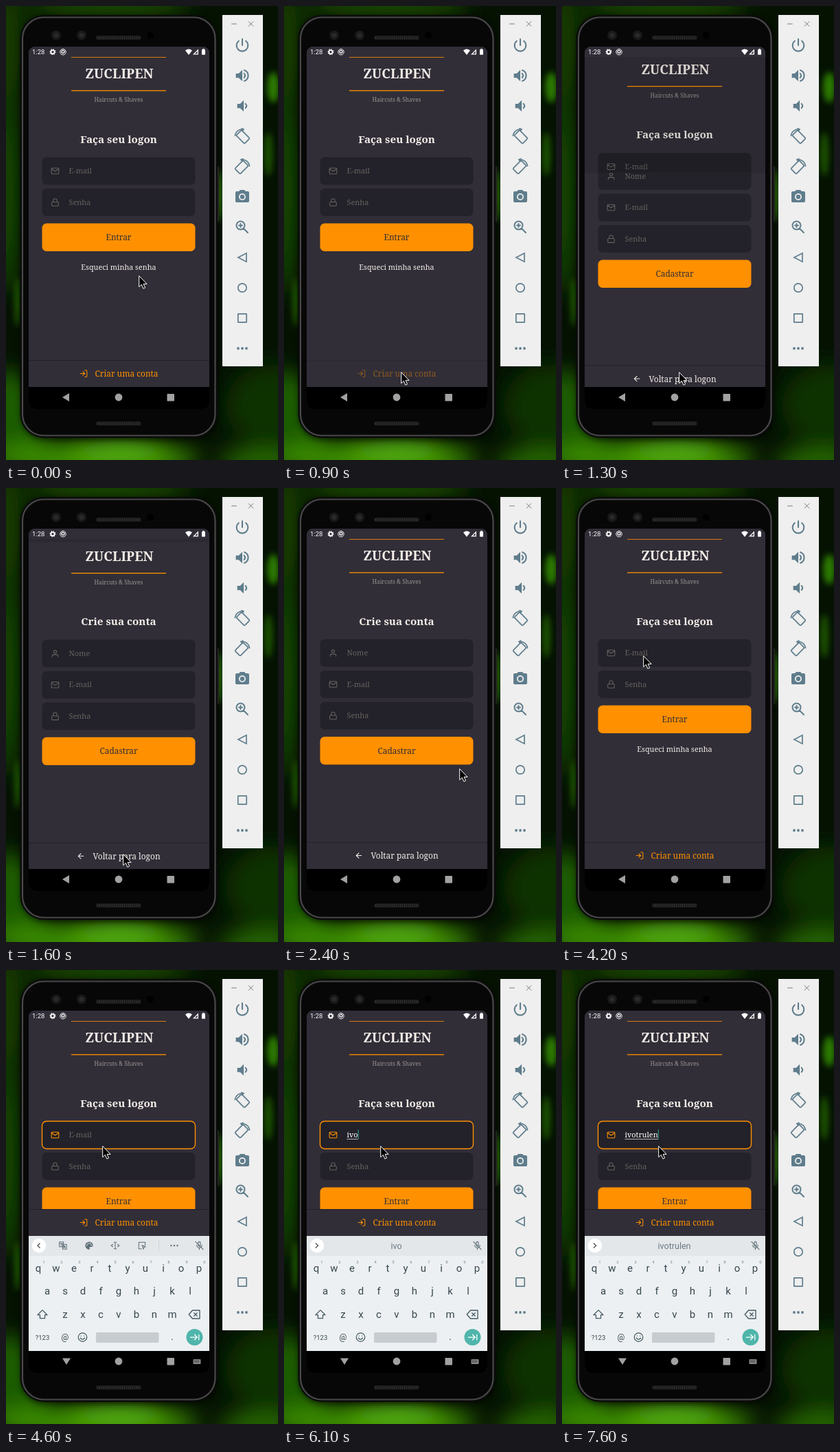
An HTML page for the animation above (8000 ms loop, 396x659 px).

```html
<!DOCTYPE html>
<html lang="pt">
<head>
<meta charset="utf-8">
<title>Logon</title>
<style>
html, body { margin: 0; width: 100%; height: 100%; overflow: hidden; background: #051202 }
svg { display: block; width: 396px; height: 659px }
text { font-family: "Noto Serif", serif; font-size: 11.9px; font-weight: 500; fill: #f4ede8 }
.mid, .key, .hint { text-anchor: middle }
.title { font-size: 15.2px; font-weight: 700 }
.input { font-size: 10.9px; font-weight: 400; fill: #666360 }
.dark { fill: #312e38 }
.key, .sans, .hint { font-family: Roboto, sans-serif; font-size: 15px; font-weight: 400; fill: #37474f }
.hint { font-size: 6px; fill: #78868d }
</style>
</head>
<body>
<svg viewBox="0 0 396 659" id="stage"></svg>
<script>
const ORANGE = '#ff9000', BG = '#312e38', SLATE = '#5f7d8c', CREAM = '#f4ede8', GREY = '#666360', KEY = '#455a64';
const NAME = 'ivotrulen';
const TOP = 59, HEIGHT = 494;

const rect = (x, y, w, h, fill, rx = 0, more = '') =>
  `<rect x="${x}" y="${y}" width="${w}" height="${h}" rx="${rx}" fill="${fill}" ${more}/>`;
const dot = (x, y, r, fill, more = '') => `<circle cx="${x}" cy="${y}" r="${r}" fill="${fill}" ${more}/>`;
const path = (d, fill, more = '') => `<path d="${d}" fill="${fill}" ${more}/>`;
const text = (x, y, s, cls = '', more = '') => `<text x="${x}" y="${y}" class="${cls}" ${more}>${s}</text>`;
// 24-unit icons centred on x, y
const place = (x, y, size) => `transform="translate(${x} ${y}) scale(${size / 24}) translate(-12 -12)"`;
const icon = (x, y, size, d, color, width = 2, more = '') => path(d, 'none', place(x, y, size) +
  ` stroke="${color}" stroke-width="${width}" stroke-linecap="round" stroke-linejoin="round" ${more}`);
const solid = (x, y, size, d, color) => path(d, color, place(x, y, size) + ' fill-rule="evenodd"');

const ring = (x, y, r) => `M${x - r} ${y}a${r} ${r} 0 1 0 ${2 * r} 0a${r} ${r} 0 1 0 ${-2 * r} 0z`;
const MAIL = 'M4 4h16a2 2 0 0 1 2 2v12a2 2 0 0 1-2 2H4a2 2 0 0 1-2-2V6a2 2 0 0 1 2-2zM22 6l-10 7L2 6';
const LOCK = 'M5 11h14a2 2 0 0 1 2 2v7a2 2 0 0 1-2 2H5a2 2 0 0 1-2-2v-7a2 2 0 0 1 2-2zM7 11V7a5 5 0 0 1 10 0v4';
const USER = 'M20 21v-2a4 4 0 0 0-4-4H8a4 4 0 0 0-4 4v2' + ring(12, 7, 4);
const LOGIN = 'M15 3h4a2 2 0 0 1 2 2v14a2 2 0 0 1-2 2h-4M10 17l5-5-5-5M15 12H3';
const BACK = 'M19 12H5M12 19l-7-7 7-7';
const MIC = 'M12 3a2.5 2.5 0 0 1 2.5 3v5a2.5 2.5 0 0 1-5 0V6a2.5 2.5 0 0 1 2.5-3M6 11a6 6 0 0 0 12 0M12 17v4M3 3l18 18';

function field(y, d, label, id = '') {
  return rect(52.5, y, 223, 40, '#232129', 6.5, id && `id="${id}Box"`) +
    icon(71.5, y + 20, 12.8, d, GREY, 2, id && `id="${id}Icon"`) +
    text(91.5, y + 23.7, label, 'input', id && `id="${id}Label"`);
}

const button = (y, label) => rect(52.5, y, 223, 40.5, ORANGE, 6.5) + text(164, y + 24.5, label, 'mid dark');

const header = title => rect(33, TOP, 263, HEIGHT + 30, BG) +
  rect(95, 74, 138, 1, ORANGE, 0, 'opacity=".8"') + rect(95, 122.2, 138, 1.3, ORANGE) +
  text(165, 105, 'ZUCLIPEN', 'mid', 'style="font-size:19px;font-weight:700"') +
  text(164, 139, 'Haircuts &amp; Shaves', 'mid', 'style="font-size:8.2px;fill:#999591"') +
  text(164, 198.7, title, 'mid title');

const footer = (id, d, iconX, textX, label, color) => `<g id="${id}">` +
  rect(33, 514, 263, 39, BG) + rect(33, 514, 263, 1, '#232129') +
  icon(iconX, 533.5, 12.8, d, color) + text(textX, 538, label, '', `style="fill:${color}"`) + '</g>';

function backdrop() {
  const glow = ([x, y, rx, ry, c]) => `<ellipse cx="${x}" cy="${y}" rx="${rx}" ry="${ry}" fill="${c}"/>`;
  const soft = [
    [0, 60, 30, 90, '#123a00'], [0, 270, 22, 150, '#184a00'], [0, 600, 60, 70, '#1f5c00'],
    [150, 0, 120, 18, '#1d5000'], [390, 580, 70, 60, '#0e3300'], [130, 658, 150, 26, '#3c9200'],
    [165, 645, 70, 16, '#58b808'], [370, 662, 60, 18, '#2a7200']
  ];
  const crisp = [
    [389, 118, 9, 22, '#2c7800'], [382, 215, 6, 32, '#1b5200'], [311, 275, 3, 38, '#3c9a00'], [17, 430, 3, 36, '#2c7a00']
  ];
  return `<g filter="url(#haze)">${soft.map(glow).join('')}</g><g filter="url(#blur)">${crisp.map(glow).join('')}</g>`;
}

const grille = y => rect(131, y, 66, 6, '#1c1c1c', 3) +
  path(`M133 ${y + 3}h62`, 'none', 'stroke="#303030" stroke-width="4" stroke-dasharray="1 2"');

function phone() {
  return rect(21, 15, 287, 614, '#000', 34, 'filter="url(#blur)" opacity=".6"') +
    rect(307, 233, 3, 80, '#242424', 1) +
    rect(20.5, 13, 287.5, 614, '#0b0b0b', 35) +
    rect(24, 16.5, 280.5, 607, '#080808', 31, 'stroke="#484848" stroke-width="2.2"') +
    rect(28, 20, 272.5, 600, '#070707', 27) +
    [73, 110].map(x => dot(x, 42.5, 7, '#191919') + dot(x, 42.5, 3.5, '#292929')).join('') +
    dot(210, 42.5, 5, '#000') + grille(43) + grille(603);
}

function statusBar() {
  return rect(33, TOP, 263, 15, BG) +
    text(38, 70.3, '1:28', 'sans', 'style="font-size:9.5px;fill:#fff"') +
    dot(68, 66.7, 2.6, 'none', 'stroke="#fff" stroke-width="1.8"') +
    dot(68, 66.7, 3.9, 'none', 'stroke="#fff" stroke-width="1.2" stroke-dasharray="1.5 1.56"') +
    dot(83, 66.7, 4.2, 'none', 'stroke="#fff"') + dot(83, 66.3, 2, 'none', 'stroke="#fff" stroke-width="1.3"') +
    path('M261 64.5q5-4 10 0l-5 6.5zM280 62.5v8h-8z', '#fff') +
    path('M278.7 65.5v3.7h-3.7z', BG) +
    rect(285, 63.2, 5, 7.5, '#fff', .7) + rect(286.3, 62, 2.4, 2, '#fff');
}

function navBar() {
  const light = '#a2a2a2';
  return rect(33, 553, 263, 33, '#000') +
    path('M82 568l10-6v12z', light, 'id="navBack"') + path('M82 563.5h12l-6 9.5z', light, 'id="navDown"') +
    dot(164, 568, 5.4, light) + rect(234.5, 563, 10.5, 10.5, light, .7) +
    '<g id="navKeys">' + rect(272.5, 565, 11, 7, '#888', 1) +
    path('M274 567h8M274 569h8', 'none', 'stroke="#000" stroke-dasharray="1 1"') + '</g>';
}

function keyboard() {
  const row = (keys, x, y, cls = 'key') => [...keys].map((k, i) => text(x + 26 * i, y, k, cls)).join('');
  const tool = (x, d) => icon(x, 400, 14, d, '#607078', 1.8);
  return rect(33, 386, 263, 190, '#edf0f2') + rect(33, 386, 263, 29, '#e3e7ea') +
    dot(48, 400, 10.3, '#fff') + path('', 'none', 'id="chevron" stroke="#555" stroke-width="1.4"') +
    icon(281.5, 400, 15, MIC, '#607078', 1.8) +
    '<g id="tools">' +
    tool(83, 'M3 3h10v12H3zM11 9h10v12H11zM5 7h6M8 7v5M14 18l2-6 2 6') +
    solid(121, 400, 15, 'M12 3a9 9 0 0 0 0 18c2 0 2-2 1-3s0-3 2-3h2c3 0 4-2 4-4c0-4-4-8-9-8' +
      ring(6.5, 11, 1.5) + ring(9.5, 7, 1.5) + ring(14.5, 7, 1.5) + ring(17.5, 11, 1.5), '#607078') +
    tool(159, 'M9 4h6M12 4v16M9 20h6M6 9l-4 3 4 3M18 9l4 3-4 3') +
    tool(198, 'M20 11V4H4v16h7M12 11l9 4-4 1-1 5z') +
    rect(222, 392, 1, 16, '#cfd5d8') + [240.5, 245, 249.5].map(x => dot(x, 400, 1.2, '#607078')).join('') + '</g>' +
    text(163.5, 404.7, '', 'key', 'id="suggestion" style="font-size:12.5px;fill:#6c7a82"') +
    row('qwertyuiop', 47, 437.5) + row('1234567890', 55, 426, 'hint') +
    row('asdfghjkl', 60, 471) + row('zxcvbnm', 86, 504.5) +
    icon(53, 500, 17, 'M12 3L2 13h5v7h10v-7h5z', KEY, 1.8) +
    icon(274.5, 500, 18, 'M8 4h14v16H8l-7-8zM11 9l6 6M17 9l-6 6', KEY, 1.8) +
    text(53, 536.5, '?123', 'key', 'style="font-size:9.5px"') + text(86, 537, '@', 'key', 'style="font-size:12px"') +
    icon(111.5, 533, 15, ring(12, 12, 10) + 'M7 14q5 6 10 0M8.5 9v.1M15.5 9v.1', KEY) +
    rect(131, 526, 91.5, 15, '#c7ccd0', 2) + text(242, 537, '.', 'key') +
    dot(274.5, 533, 12, '#4fb5ab') + icon(274.5, 533, 15, 'M2 12h16M12 6l6 6-6 6M22 6v12', '#fff');
}

function toolbar() {
  const small = (x, d) => icon(x, 26, 9, d, '#777', 2.6);
  const line = `stroke="${SLATE}" stroke-width="1.7"`;
  const tilt = (y, flip) => `<g transform="translate(344 ${y}) scale(${flip} 1)" fill="none" ${line}>` +
    '<rect x="-5.5" y="-8.5" width="11" height="17" rx="1.5" transform="translate(1 1) rotate(-45)"/>' +
    '<path d="M-10.5 0A10.500 10.500 0 0 1 2-10M-1.500-11.500l3.500 1.500-2.500 3"/></g>';
  return rect(315, 13, 59, 510, '#efefef') +
    small(332, 'M3 12h18') + small(356.5, 'M3 3l18 18M21 3L3 21') +
    icon(344, 57, 25, 'M12 3.500v8.500M7 6a8 8 0 1 0 10 0', SLATE, 2) +
    solid(344, 101, 25, 'M3 9v6h4l5 5V4L7 9z', SLATE) +
    icon(344, 101, 25, 'M14.5 9q3 3 0 6M15 4.500a8 8 0 0 1 0 15', SLATE) +
    solid(344, 145, 25, 'M5 9v6h4l5 5V4L9 9z', SLATE) + icon(344, 145, 25, 'M16.5 9q3 3 0 6', SLATE) +
    tilt(189, 1) + tilt(233, -1) +
    solid(344, 277, 24, 'M9 2L7 4H4a2 2 0 0 0-2 2v12a2 2 0 0 0 2 2h16a2 2 0 0 0 2-2V6a2 2 0 0 0-2-2h-3l-2-2z' +
      ring(12, 12, 5) + ring(12, 12, 3.2), SLATE) +
    icon(344, 321, 24, ring(9.5, 9.5, 6) + 'M14 14l6 6M7 9.5h5M9.5 7v5', SLATE) +
    path('M338 365l12-6.2v12.4z', 'none', line) +
    dot(344, 409, 6.2, 'none', line) + rect(337.8, 446.8, 12.4, 12.4, 'none', .5, line) +
    [338, 344, 350].map(x => dot(x, 497, 1.9, SLATE)).join('');
}

document.getElementById('stage').innerHTML = `<defs>
  <filter id="haze" x="-100%" y="-100%" width="300%" height="300%"><feGaussianBlur stdDeviation="16"/></filter>
  <filter id="blur" x="-100%" y="-100%" width="300%" height="300%"><feGaussianBlur stdDeviation="4"/></filter>
  <clipPath id="screen"><rect x="33" y="59" width="263" height="526" rx="9"/></clipPath>
  <clipPath id="app"><rect x="33" y="74" width="263" height="479"/></clipPath>
  <clipPath id="reveal"><rect id="revealBox" x="33" width="263" height="${HEIGHT}"/></clipPath></defs>` +
  rect(0, 0, 396, 659, '#051202') + backdrop() + phone() +
  '<g clip-path="url(#screen)">' + rect(33, TOP, 263, 526, BG) + statusBar() +
  '<g clip-path="url(#app)"><g id="login">' + header('Faça seu logon') +
  field(219.5, MAIL, 'E-mail', 'mail') + rect(91.5, 245, 0, .8, '#ddd', 0, 'id="underline"') +
  rect(91.5, 231.5, 1.2, 14, '#2f9488', 0, 'id="caret"') +
  field(265, LOCK, 'Senha') + button(315.5, 'Entrar') +
  text(164, 383, 'Esqueci minha senha', 'mid', 'style="font-size:10.8px"') +
  footer('create', LOGIN, 113, 129.5, 'Criar uma conta', ORANGE) + '</g>' +
  rect(33, TOP, 263, HEIGHT, '#000', 0, 'id="shade"') +
  '<g clip-path="url(#reveal)"><g id="signup">' + header('Crie sua conta') +
  field(219.5, USER, 'Nome') + field(265, MAIL, 'E-mail') + field(310.5, LOCK, 'Senha') + button(361, 'Cadastrar') +
  footer('return', BACK, 109, 126.5, 'Voltar para logon', CREAM) + '</g></g>' +
  `<g id="keyboard">${keyboard()}</g></g>` + navBar() + '</g>' + toolbar() +
  path('M.7.7v16l3.700-3.400 2.500 5.800 2.700-1.200-2.500-5.500h5z', '#000', 'id="cursor" stroke="#fff"');

const el = Object.fromEntries([...document.querySelectorAll('#stage [id]')].map(e => [e.id, e]));
const set = (id, name, value) => el[id].setAttribute(name, value);
const show = (id, on) => set(id, 'visibility', on ? 'visible' : 'hidden');
const shift = (id, y) => set(id, 'transform', `translate(0 ${y})`);

// cubic-bezier(.208, .82, .25, 1)
function ease(u) {
  if (u <= 0) return 0;
  if (u >= 1) return 1;
  const curve = (s, a, b) => 3 * (1 - s) ** 2 * s * a + 3 * (1 - s) * s * s * b + s ** 3;
  let lo = 0, hi = 1;
  for (let i = 0; i < 24; i++) {
    const s = (lo + hi) / 2;
    if (curve(s, .208, .25) < u) lo = s; else hi = s;
  }
  return curve(lo, .82, 1);
}

const pointer = [[0, 193, 391], [400, 174, 470], [600, 161, 524], [700, 170, 531], [2000, 170, 531],
  [2100, 175, 527], [2400, 255, 407], [2900, 255, 407], [3000, 176, 524], [3200, 176, 524],
  [3400, 141, 504], [4200, 118, 243], [4400, 118, 243], [4600, 140, 255], [8000, 140, 255]];
const strokes = [5700, 6000, 6100, 6300, 6700, 7000, 7100, 7500, 7600];

function pointerAt(t) {
  const i = pointer.findIndex(k => k[0] > t), [t0, x0, y0] = pointer[i - 1], [t1, x1, y1] = pointer[i];
  const u = (t - t0) / (t1 - t0);
  return [x0 + (x1 - x0) * u, y0 + (y1 - y0) * u];
}

function draw() {
  const t = Math.floor(performance.now() % 8000 / 100) * 100;

  const p = t < 1300 ? 0 : t < 3300 ? ease((t - 1150) / 800) : 1 - ease((t - 3332) / 800);
  shift('login', -.02 * HEIGHT * p);
  shift('signup', .041 * HEIGHT * (1 - p));
  set('revealBox', 'y', TOP + HEIGHT * (1 - p));
  set('shade', 'opacity', .1 * Math.min(1, p / .36));
  show('signup', p > 0);
  set('create', 'opacity', t === 900 ? .45 : 1);
  set('return', 'opacity', t >= 3300 && t < 3600 ? .45 : 1);

  const focus = t >= 4300, typed = NAME.slice(0, strokes.filter(s => s <= t).length);
  set('mailBox', 'stroke', focus ? ORANGE : 'none');
  set('mailBox', 'stroke-width', 1.4);
  set('mailIcon', 'stroke', focus ? ORANGE : GREY);
  el.mailLabel.textContent = typed || 'E-mail';
  el.mailLabel.style.fill = typed ? '#fff' : GREY;
  const width = typed ? el.mailLabel.getComputedTextLength() : 0;
  set('underline', 'width', width);
  set('caret', 'x', 91.5 + width);
  show('caret', t >= 5300);

  shift('create', t >= 4500 ? -167 : 0);
  shift('keyboard', t >= 4600 ? 0 : t >= 4500 ? 20 : 110);
  show('keyboard', focus);
  set('tools', 'opacity', typed ? 0 : 1);
  el.suggestion.textContent = typed;
  set('chevron', 'd', typed ? 'M46 396.5l3.5 3.5-3.5 3.5' : 'M49.5 396.5l-3.5 3.5 3.5 3.5');
  show('navBack', !focus);
  show('navDown', focus);
  show('navKeys', focus);

  set('cursor', 'transform', `translate(${pointerAt(t)})`);
  requestAnimationFrame(draw);
}
draw();
</script>
</body>
</html>
```
